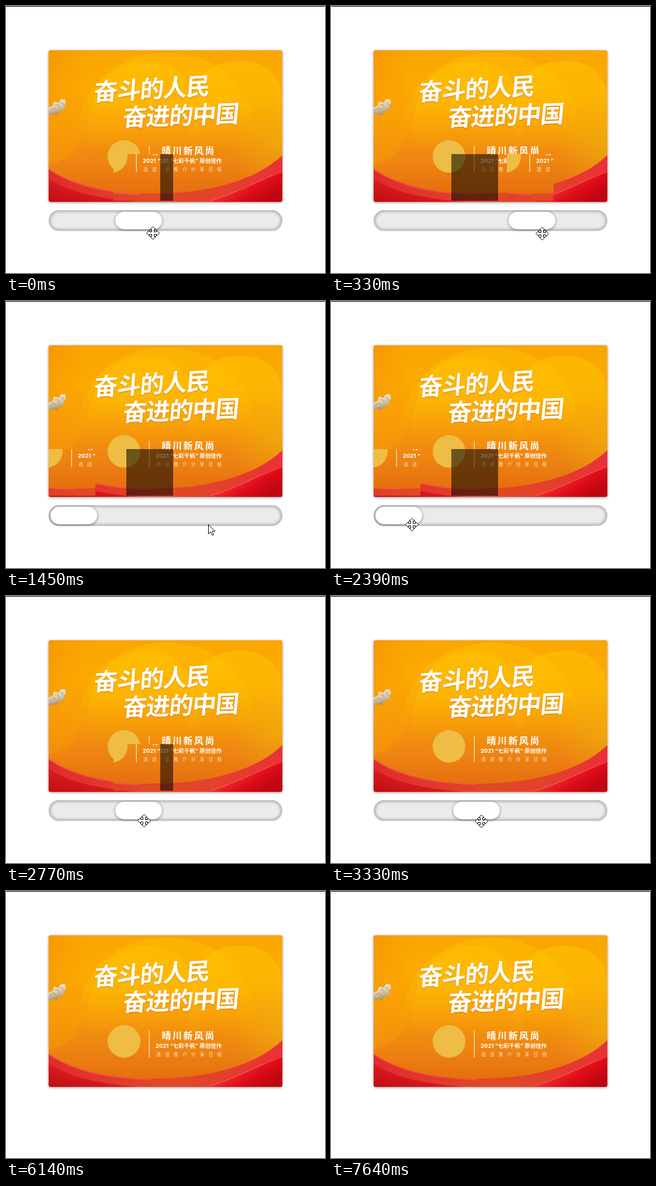
An HTML page with a canvas that plays this animation: 546 by 458 pixels, repeating every 8.71 s.

```html
<!DOCTYPE html>
<html lang="zh">
<head>
<meta charset="utf-8">
<title>Slider puzzle</title>
<style>
html, body { margin: 0; width: 100%; height: 100%; overflow: hidden; background: #fff; }
canvas { display: block; }
</style>
</head>
<body>
<canvas id="stage" width="546" height="458"></canvas>
<script>
const LOOP = 8710;
const CARD = { x: 73, y: 76, w: 400, h: 260 };
const HOLE = { x: 206, y: 254, size: 80 };
const CJK = '"Noto Sans CJK SC", "Noto Sans CJK", sans-serif';
const ctx = document.getElementById('stage').getContext('2d');

// Keys are [ms, value]
const SLIDE = [[0, 111], [680, 303], [1060, 303], [1360, 0], [2430, 0],
  [2770, 111], [3230, 131], [3470, 134]];
const POINTER_X = [[0, 251], [680, 432], [1080, 432], [1450, 346], [1920, 150], [2160, 138],
  [2390, 138], [2440, 125], [2770, 236], [3230, 255], [3470, 258], [5060, 258], [5300, 429]];
const POINTER_Y = [[0, 390], [700, 393], [890, 396], [1080, 396], [1450, 384], [2390, 384],
  [2770, 386], [3470, 387], [5060, 387], [5300, 460]];

const ramp = (t, a, b) => Math.min(1, Math.max(0, (t - a) / (b - a)));

// Monotone cubic through the keys
function track(keys, t) {
  const last = keys.length - 1;
  if (t >= keys[last][0]) return keys[last][1];
  let i = 0;
  while (t >= keys[i + 1][0]) i++;
  const slope = k => (keys[k + 1][1] - keys[k][1]) / (keys[k + 1][0] - keys[k][0]);
  const tangent = k => {
    if (k === 0) return slope(0);
    if (k === last) return 0;
    const a = slope(k - 1), b = slope(k);
    return a * b <= 0 ? 0 : 2 * a * b / (a + b);
  };
  const [t0, v0] = keys[i], [t1, v1] = keys[i + 1];
  const d = t1 - t0, u = (t - t0) / d, w = 1 - u;
  return v0 * (1 + 2 * u) * w * w + tangent(i) * d * u * w * w
    + v1 * u * u * (3 - 2 * u) - tangent(i + 1) * d * u * u * w;
}

function roundBox(c, x, y, w, h, r) {
  c.beginPath();
  c.roundRect(x, y, w, h, r);
}

function linear(c, x0, y0, x1, y1, ...colors) {
  const g = c.createLinearGradient(x0, y0, x1, y1);
  colors.forEach((color, i) => g.addColorStop(i / (colors.length - 1), color));
  return g;
}

function fillPath(c, d, fill) {
  c.fillStyle = fill;
  c.fill(new Path2D(d));
}

function spread(c, text, x, y, step) {
  [...text].forEach((ch, i) => c.fillText(ch, x + i * step, y));
}

function headline(c, text, x, y, angle) {
  c.save();
  c.translate(x, y);
  c.rotate(angle);
  c.transform(1, 0, -0.13, 1, 0, 0);
  c.font = `bold 41px ${CJK}`;
  c.textAlign = 'center';
  c.textBaseline = 'middle';
  c.shadowColor = 'rgba(190,80,0,.55)';
  c.shadowBlur = 2;
  c.shadowOffsetY = 1;
  c.fillStyle = '#fff';
  spread(c, text, 0, 0, 39.6);
  c.restore();
}

function backdrop(c) {
  c.fillStyle = linear(c, 0, 76, 0, 336, '#faa600', '#fcaa02', '#f79a0a', '#ee8412', '#e3690f');
  c.fillRect(CARD.x, CARD.y, CARD.w, CARD.h);

  // Overlapping pools of yellow light
  const light = a => linear(c, 0, 90, 0, 250, `rgba(255,200,0,${a})`, `rgba(255,196,0,${a * 0.8})`, 'rgba(250,170,0,0)');
  fillPath(c, 'M122 250C112 150 180 80 275 80C370 80 435 150 428 250Z', light(0.35));
  fillPath(c, 'M137 250C135 150 175 95 240 94C305 94 330 140 330 250Z', light(0.4));
  fillPath(c, 'M318 250C300 150 330 94 400 94C455 94 473 130 473 165V250Z', light(0.5));

  fillPath(c, 'M73 95H98Q127 97 127 140V215Q125 262 73 272Z', 'rgba(250,160,0,.35)');
  c.fillStyle = linear(c, 73, 76, 150, 110, 'rgba(240,135,0,.5)', 'rgba(250,160,0,0)');
  c.fillRect(73, 76, 120, 260);

  const glow = c.createRadialGradient(475, 235, 0, 475, 235, 90);
  glow.addColorStop(0, 'rgba(236,184,10,.55)');
  glow.addColorStop(1, 'rgba(236,184,10,0)');
  c.fillStyle = glow;
  c.fillRect(CARD.x, CARD.y, CARD.w, CARD.h);
}

function carving(c) {
  fillPath(c, 'M73 188V174L80 171L82 164L90 166L94 160L101 160L103 167L99 171L101 177L92 181L87 187L79 186Z',
    linear(c, 80, 160, 88, 190, '#f5eee0', '#d8c8ab', '#9d794b'));
  c.strokeStyle = 'rgba(140,110,70,.6)';
  c.lineWidth = 1;
  c.stroke(new Path2D('M75 180Q81 172 86 178M84 169Q91 168 91 175M93 166Q99 164 97 171'));
}

function ribbons(c) {
  fillPath(c, 'M73 279C115 308 175 321 250 322C340 322 425 302 473 256V336H73Z',
    linear(c, 73, 0, 473, 0, '#e22a2c', '#e2382c', '#e04a24', '#e4402c', '#ea3038'));
  fillPath(c, 'M73 296C105 318 150 329 225 336H73Z',
    linear(c, 100, 300, 90, 336, '#dc1c22', '#c20f14'));
  fillPath(c, 'M345 336C395 321 430 300 473 283V336Z',
    linear(c, 400, 305, 425, 345, '#ee2a30', '#dc0c18', '#c00612'));
  c.strokeStyle = 'rgba(255,120,100,.5)';
  c.lineWidth = 1.5;
  c.stroke(new Path2D('M73 280C115 309 175 322 250 323M350 334C395 321 430 300 473 284'));
}

function captions(c) {
  headline(c, '奋斗的人民', 171, 146, -0.055);
  headline(c, '奋进的中国', 221, 190, -0.035);

  c.fillStyle = '#edbd45';
  c.beginPath();
  c.arc(202, 258, 28, 0, Math.PI * 2);
  c.fill();

  c.fillStyle = 'rgba(255,245,220,.75)';
  c.fillRect(244.5, 240, 1.5, 45);
  c.fillStyle = '#fff';
  c.textBaseline = 'middle';
  c.font = `bold 16px ${CJK}`;
  spread(c, '晴川新风尚', 266.5, 248, 18.5);
  c.font = `bold 9.5px Inter, ${CJK}`;
  c.fillText('2021 “七彩千帆” 原创佳作', 256, 266);
  c.font = `8px ${CJK}`;
  c.fillStyle = 'rgba(255,250,235,.85)';
  spread(c, '选送推介分享日程', 257, 280, 14.9);
}

function paintPicture() {
  const sheet = document.createElement('canvas');
  sheet.width = CARD.w;
  sheet.height = CARD.h;
  const c = sheet.getContext('2d');
  c.translate(-CARD.x, -CARD.y);
  roundBox(c, CARD.x, CARD.y, CARD.w, CARD.h, 4);
  c.clip();
  backdrop(c);
  carving(c);
  ribbons(c);
  captions(c);
  return sheet;
}

const picture = paintPicture();

function drawCard() {
  ctx.save();
  ctx.shadowColor = 'rgba(0,0,0,.45)';
  ctx.shadowBlur = 4;
  ctx.shadowOffsetY = 1;
  ctx.fillStyle = '#f59a08';
  roundBox(ctx, CARD.x, CARD.y, CARD.w, CARD.h, 4);
  ctx.fill();
  ctx.restore();
  ctx.drawImage(picture, CARD.x, CARD.y);
}

function drawPuzzle(slide, holeAlpha, pieceAlpha) {
  const { x, y, size } = HOLE;
  ctx.fillStyle = `rgba(0,0,0,${0.55 * holeAlpha})`;
  ctx.fillRect(x, y, size, size);
  ctx.globalAlpha = pieceAlpha;
  ctx.drawImage(picture, x - CARD.x, y - CARD.y, size, size, CARD.x + slide, y, size, size);
  ctx.globalAlpha = 1;
}

function drawSlider(slide, alpha) {
  if (!alpha) return;
  ctx.save();
  ctx.globalAlpha = alpha;
  roundBox(ctx, 73, 350, 400, 36, 18);
  ctx.fillStyle = '#ebebeb';
  ctx.fill();
  ctx.save();
  ctx.clip();
  ctx.shadowColor = 'rgba(0,0,0,.4)';
  ctx.shadowBlur = 5;
  ctx.strokeStyle = '#c6c6c6';
  ctx.lineWidth = 4;
  roundBox(ctx, 73, 350, 400, 36, 18);
  ctx.stroke();
  ctx.restore();
  ctx.shadowColor = 'rgba(0,0,0,.45)';
  ctx.shadowBlur = 5;
  ctx.shadowOffsetY = 1;
  ctx.fillStyle = '#fff';
  roundBox(ctx, 76 + slide, 353, 80, 30, 15);
  ctx.fill();
  ctx.restore();
}

const ARROW = new Path2D('M0 0V16L3.8 12.6L6.4 18.4L9 17.2L6.5 11.6H11.4Z');
const MOVE = new Path2D();
for (let i = 0; i < 4; i++) {
  const a = i * Math.PI / 2, cos = Math.cos(a), sin = Math.sin(a);
  for (const [x, y] of [[-2, -2], [-2, -6], [-5, -6], [0, -11], [5, -6], [2, -6]]) {
    MOVE.lineTo(x * cos - y * sin, x * sin + y * cos);
  }
}
MOVE.closePath();

function drawPointer(t) {
  if (t >= 5300) return;
  const arrow = (t > 1060 && t < 1950) || t > 5060;
  const shape = arrow ? ARROW : MOVE;
  ctx.save();
  ctx.translate(Math.round(track(POINTER_X, t)) + 0.5, Math.round(track(POINTER_Y, t)) - 0.5);
  ctx.fillStyle = '#fff';
  ctx.strokeStyle = '#000';
  ctx.lineWidth = 1;
  ctx.fill(shape);
  ctx.stroke(shape);
  ctx.restore();
}

function draw(t) {
  ctx.fillStyle = '#fff';
  ctx.fillRect(0, 0, 546, 458);
  ctx.fillStyle = '#000';
  ctx.fillRect(0, 0, 546, 1);

  const slide = Math.round(track(SLIDE, t));
  const shown = 1 - ramp(t, 3960, 4250);
  drawCard();
  drawPuzzle(slide, shown, 1 - ramp(t, 4280, 4640));
  drawSlider(slide, shown);
  drawPointer(t);
}

const start = performance.now();
function tick() {
  draw((performance.now() - start) % LOOP);
  requestAnimationFrame(tick);
}
tick();
</script>
</body>
</html>
```
